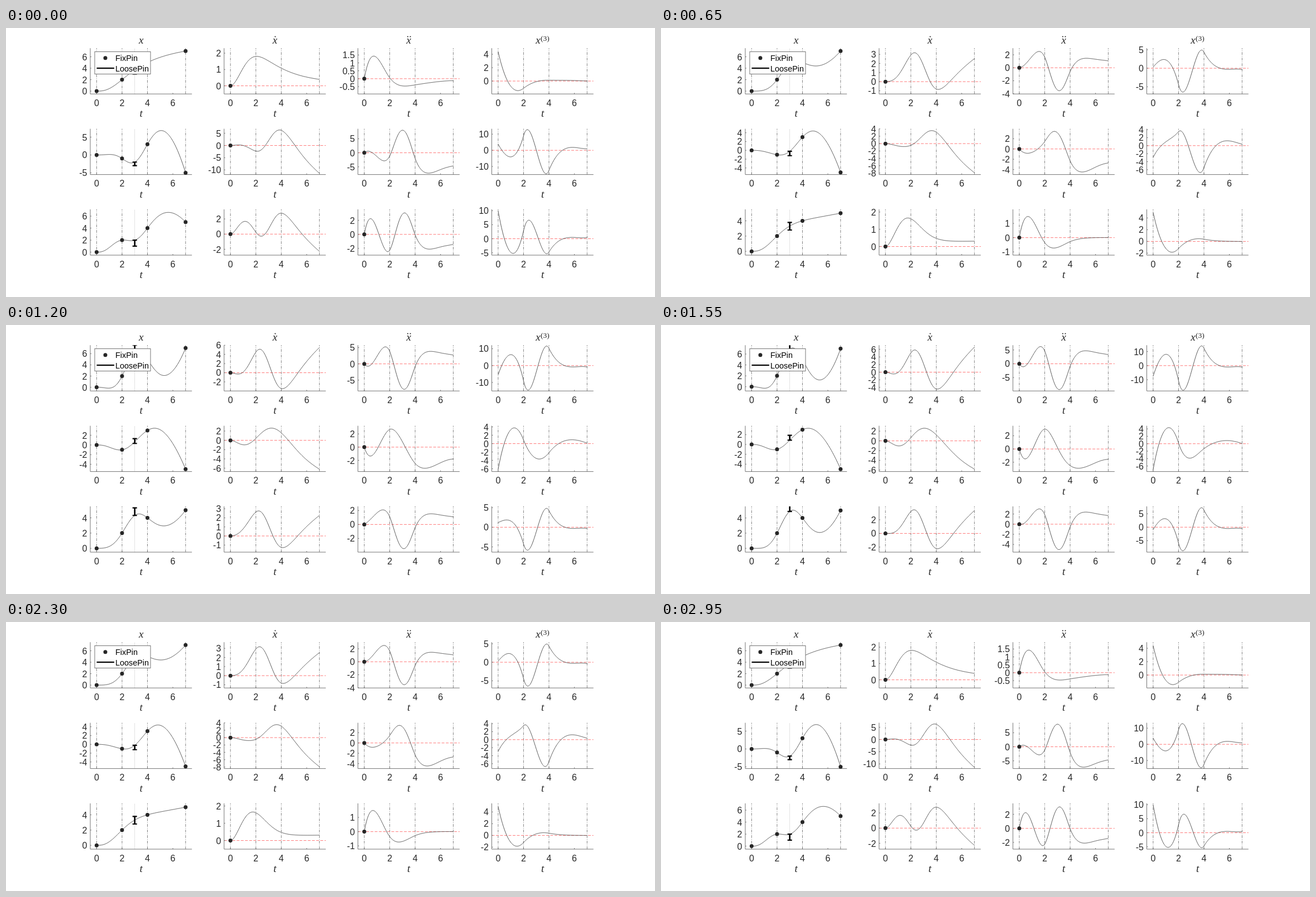
Recreate the animation shown at these times as an HTML page with a canvas. Size 1163 px wide and 482 px high, loop 3 s.

```html
<!DOCTYPE html>
<html>
<head>
<meta charset="utf-8">
<style>
html, body { margin: 0; width: 100%; height: 100%; overflow: hidden; background: #fff; }
canvas { display: block; }
</style>
</head>
<body>
<canvas id="stage" width="1163" height="482"></canvas>
<script>
const ctx = document.getElementById('stage').getContext('2d');
const SANS = '"Liberation Sans", Arial, sans-serif';
const SERIF = '"Liberation Serif", "Times New Roman", serif';
const INK = '#262626';

// ---- Trajectory: degree 6 spline, least squared acceleration + jerk ----
const KNOTS = [0, 2, 4, 7];
const WAYPOINTS = [[0, 2, 5, 7], [0, -1, 3, -5], [0, 2, 4, 5]];
const LOOSE = [[3, 4.2], [-3, -2], [1, 2]];
const LOOSE_T = 3, SHIFT = 4, STEPS = 30, STEP_MS = 50;

// Truncated powers [start, power]; x, x' and x'' vanish at t = 0.
const BASIS = [[0, 3], [0, 4], [0, 5], [0, 6], [2, 5], [2, 6], [4, 5], [4, 6]];

function basisAt(t, d) {
  return BASIS.map(([start, p]) => {
    if (t < start) return 0;
    let f = 1;
    for (let i = 0; i < d; i++) f *= p - i;
    return f * (t - start) ** (p - d);
  });
}

const ENERGY = BASIS.map(() => BASIS.map(() => 0));
const CELLS = 280, H = 7 / CELLS;
for (let n = 0; n <= CELLS; n++) {
  const w = H / 3 * (n === 0 || n === CELLS ? 1 : n % 2 ? 4 : 2);
  for (const d of [2, 3]) {
    const b = basisAt(n * H, d);
    b.forEach((bi, i) => b.forEach((bj, j) => ENERGY[i][j] += w * bi * bj));
  }
}

function gauss(m) {
  const n = m.length;
  for (let c = 0; c < n; c++) {
    let p = c;
    for (let r = c + 1; r < n; r++) if (Math.abs(m[r][c]) > Math.abs(m[p][c])) p = r;
    [m[c], m[p]] = [m[p], m[c]];
    for (let r = 0; r < n; r++) {
      if (r === c) continue;
      const f = m[r][c] / m[c][c];
      for (let k = c; k <= n; k++) m[r][k] -= f * m[c][k];
    }
  }
  return m.map((row, i) => row[n] / row[i]);
}

// Minimise the energy through pins [t, value].
function fit(pins) {
  const rows = pins.map(([t]) => basisAt(t, 0));
  const optimal = ENERGY.map((e, i) => [...e, ...rows.map(r => r[i]), 0]);
  const pinned = rows.map((r, i) => [...r, ...pins.map(() => 0), pins[i][1]]);
  return gauss([...optimal, ...pinned]).slice(0, BASIS.length);
}

const valueAt = (coef, t, d) => basisAt(t, d).reduce((s, b, i) => s + b * coef[i], 0);

function solve(row, range) {
  const pins = KNOTS.slice(1).map((t, i) => [t, WAYPOINTS[row][i + 1]]);
  const coef = fit(pins);
  const x = valueAt(coef, LOOSE_T, 0);
  const held = Math.min(Math.max(x, range[0]), range[1]);
  return held === x ? coef : fit([...pins, [LOOSE_T, held]]);
}

const SAMPLES = 210;
function plotData(row, step) {
  const range = LOOSE[row].map(v => v + SHIFT * step / (STEPS - 1));
  const coef = solve(row, range);
  const curves = [0, 1, 2, 3].map(d =>
    Array.from({ length: SAMPLES + 1 }, (_, i) => valueAt(coef, 7 * i / SAMPLES, d)));
  return { range, curves };
}
const DATA = Array.from({ length: STEPS }, (_, s) => [0, 1, 2].map(r => plotData(r, s)));

// ---- Drawing ----
const PLOT_W = 182.2, PLOT_H = 82;
const plotX = col => 151 + 239.83 * col;
const plotY = row => 36.2 + 144.4 * row;

function line(x1, y1, x2, y2, color, width, dash = []) {
  ctx.setLineDash(dash);
  ctx.strokeStyle = color;
  ctx.lineWidth = width;
  ctx.beginPath();
  ctx.moveTo(x1, y1);
  ctx.lineTo(x2, y2);
  ctx.stroke();
  ctx.setLineDash([]);
}

function dot(x, y, r = 3.5) {
  ctx.fillStyle = INK;
  ctx.beginPath();
  ctx.arc(x, y, r, 0, 7);
  ctx.fill();
}

function text(str, x, y, font, align = 'center', color = INK) {
  ctx.font = font;
  ctx.textAlign = align;
  ctx.fillStyle = color;
  ctx.fillText(str, x, y);
}

// Largest 1-2-5 step that leaves at least three ticks.
function ticks(lo, hi) {
  for (let e = 2; e > -3; e--) {
    for (const m of [5, 2, 1]) {
      const step = m * 10 ** e, a = Math.ceil(lo / step), b = Math.floor(hi / step);
      if (b - a >= 2) return Array.from({ length: b - a + 1 }, (_, i) => (a + i) * step);
    }
  }
  return [];
}

function drawPlot(row, col, { range, curves }) {
  const x0 = plotX(col), y0 = plotY(row), yb = y0 + PLOT_H, curve = curves[col];
  const lo = Math.min(...curve) - 0.5, hi = Math.max(...curve) + 0.5;
  const X = t => x0 + (t + 0.5) * PLOT_W / 8;
  const Y = v => yb - (v - lo) / (hi - lo) * PLOT_H;

  for (const t of KNOTS) line(X(t), yb, X(t), y0, '#777', 0.9, [5, 2, 1, 2]);
  if (col === 0) line(X(LOOSE_T), yb, X(LOOSE_T), y0, '#aaa', 0.7, [1, 1]);
  else line(x0, Y(0), x0 + PLOT_W, Y(0), '#ff6b6b', 0.9, [5, 2.5]);

  ctx.save();
  ctx.beginPath();
  ctx.rect(x0, y0, PLOT_W, PLOT_H);
  ctx.clip();
  ctx.beginPath();
  curve.forEach((v, i) => ctx.lineTo(X(7 * i / SAMPLES), Y(v)));
  ctx.strokeStyle = '#444';
  ctx.lineWidth = 0.9;
  ctx.stroke();
  if (col === 0) {
    const [a, b] = range.map(Y), x = X(LOOSE_T);
    line(x, a, x, b, '#000', 2.6);
    for (const y of [a, b]) line(x - 4, y, x + 4, y, '#000', 2.2);
  }
  ctx.restore();

  line(x0, y0, x0, yb, '#666', 0.9);
  line(x0, yb, x0 + PLOT_W, yb, '#666', 0.9);
  for (const v of ticks(lo, hi)) {
    line(x0, Y(v), x0 + 2, Y(v), '#666', 0.9);
    text(String(+v.toFixed(2)), x0 - 5.5, Y(v) + 6, '16px ' + SANS, 'right');
  }
  for (const t of [0, 2, 4, 6]) {
    line(X(t), yb, X(t), yb - 2, '#666', 0.9);
    text(String(t), X(t), yb + 21.5, '16px ' + SANS);
  }
  text('t', x0 + PLOT_W / 2, yb + 41, 'italic 19px ' + SERIF);

  if (col === 0) KNOTS.forEach((t, i) => dot(X(t), Y(WAYPOINTS[row][i])));
  else if (col < 3) dot(X(0), Y(0));
}

function drawTitle(col) {
  const x = plotX(col) + PLOT_W / 2, font = 'italic 19px ' + SERIF;
  if (col === 3) {
    text('x', x - 8, 27.5, font);
    text('(3)', x - 3.5, 22.5, '13.5px ' + SERIF, 'left');
    return;
  }
  text('x', x, 27.5, font);
  for (let i = 0; i < col; i++) dot(x + 0.5 + (i - (col - 1) / 2) * 4.6, 15.5, 1.1);
}

function drawLegend() {
  ctx.fillStyle = '#fff';
  ctx.fillRect(159, 42.5, 100, 40);
  ctx.strokeStyle = '#666';
  ctx.lineWidth = 0.9;
  ctx.strokeRect(159, 42.5, 100, 40);
  dot(178, 53.8);
  line(162.5, 72, 194, 72, '#000', 2.2);
  text('FixPin', 196, 59.3, '14.4px ' + SANS, 'left', '#000');
  text('LoosePin', 196, 77.5, '14.4px ' + SANS, 'left', '#000');
}

function draw() {
  const n = Math.floor(performance.now() / STEP_MS) % (2 * STEPS);
  const step = n < STEPS ? n : 2 * STEPS - 1 - n;
  ctx.fillStyle = '#fff';
  ctx.fillRect(0, 0, 1163, 482);
  for (let col = 0; col < 4; col++) {
    drawTitle(col);
    for (let row = 0; row < 3; row++) drawPlot(row, col, DATA[step][row]);
  }
  drawLegend();
  requestAnimationFrame(draw);
}
draw();
</script>
</body>
</html>
```
